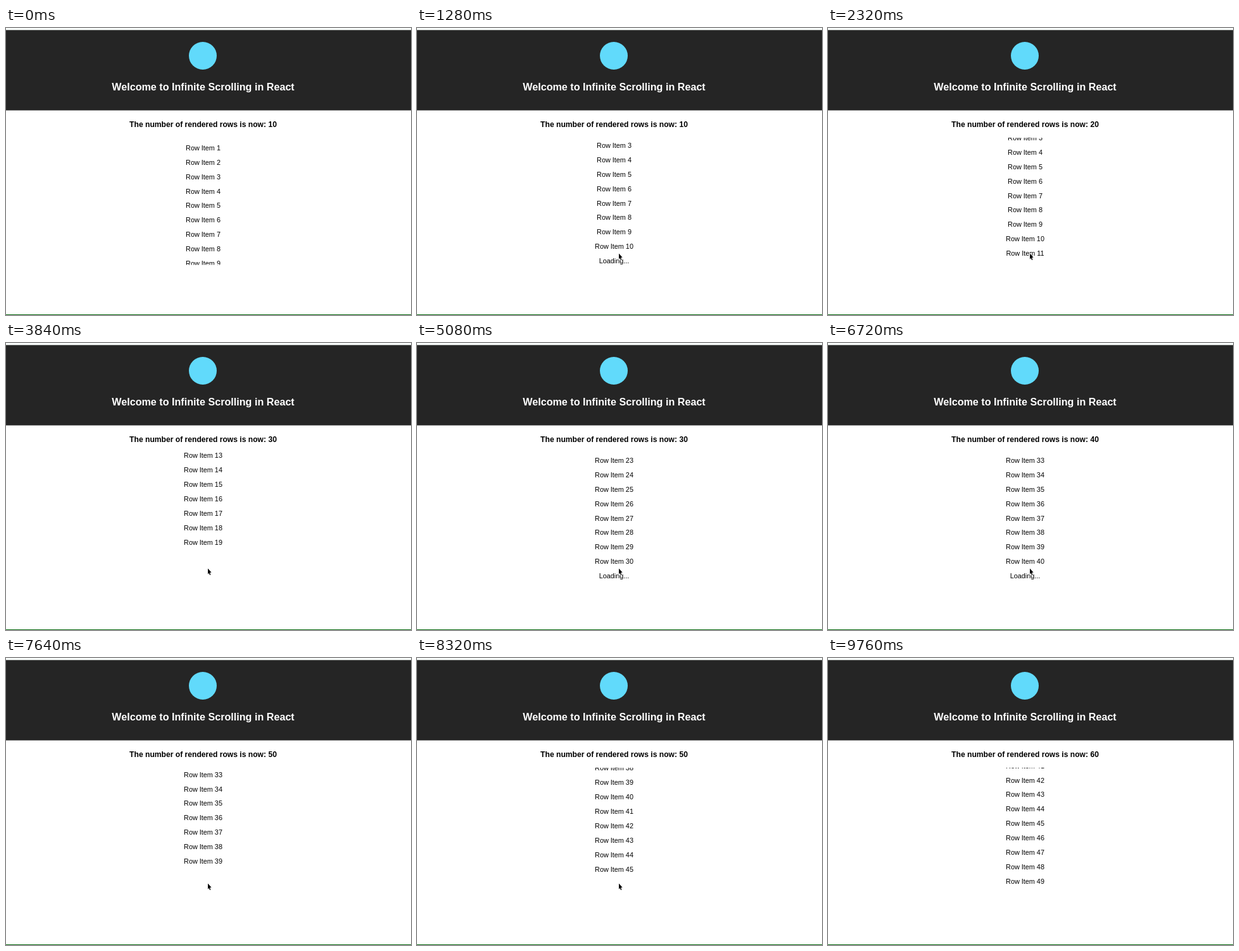
These frames come from a looping animation (640x455 px, 9.8 s). An HTML page with a canvas:

```html
<!DOCTYPE html>
<html lang="en">
<head>
<meta charset="utf-8">
<title>Infinite Scrolling</title>
<style>
  html, body { margin: 0; width: 100%; height: 100%; overflow: hidden; background: #fff; }
  canvas { display: block; width: 640px; height: 455px; }
</style>
</head>
<body>
<canvas id="stage" width="640" height="455"></canvas>
<script>
const ctx = document.getElementById('stage').getContext('2d');
const LOOP = 9800;
const FONT = '"Liberation Sans", Arial, sans-serif';
const CENTER = 311.5;
const LIST = { top: 174, bottom: 375.5, first: 194, pitch: 22.87 };

// Each batch of rows: pause, flick to the end of the list, wait, load.
const BATCH = 10;
const PAUSE = 680;
const WAIT = 300;
const FIRST_FLICK = 49.7;
const loads = [1577, 3020, 5280, 6900, 9268];
const flicks = loads.map((load, i) => ({
  start: (i ? loads[i - 1] : 0) + PAUSE,
  end: load - WAIT,
  distance: i ? BATCH * LIST.pitch : FIRST_FLICK
}));

const progress = (t, start, end) => Math.min(1, Math.max(0, (t - start) / (end - start)));
const smooth = p => p * p * (3 - 2 * p);
const ease = (t, start, end) => smooth(progress(t, start, end));

function scrollAt(t) {
  const down = flicks.reduce((sum, f) => sum + f.distance * ease(t, f.start, f.end), 0);
  return down - 30.4 * ease(t, 9300, 9640);
}

// In a long list the rows near the lower edge are painted late in a flick.
function paintedEdge(t, count) {
  const late = flicks.some(f => {
    const p = progress(t, f.start, f.end);
    return p > 0 && p < 0.6;
  });
  return late && count > 2 * BATCH ? 340 : LIST.bottom + 5;
}

function text(str, y, size, color, weight = '') {
  ctx.font = `${weight} ${size}px ${FONT}`;
  ctx.fillStyle = color;
  ctx.textAlign = 'center';
  ctx.fillText(str, CENTER, y);
}

function drawHeader() {
  ctx.fillStyle = '#f8fdfa';
  ctx.fillRect(0, 0, 640, 4);
  ctx.fillStyle = '#252525';
  ctx.fillRect(0, 3.3, 640, 127.3);
  ctx.fillStyle = '#61dafb';
  ctx.beginPath();
  ctx.arc(311, 44, 22, 0, Math.PI * 2);
  ctx.fill();
  text('Welcome to Infinite Scrolling in React', 98.8, 16.15, '#fff', 'bold');
}

function drawList(t, count) {
  const scroll = scrollAt(t);
  const edge = paintedEdge(t, count);
  ctx.save();
  ctx.beginPath();
  ctx.rect(0, LIST.top, 640, LIST.bottom - LIST.top);
  ctx.clip();
  for (let row = 1; row <= count + 1; row++) {
    const y = LIST.first + (row - 1) * LIST.pitch - scroll;
    if (y < LIST.top - 5 || y > edge) continue;
    text(row > count ? 'Loading...' : `Row Item ${row}`, y, 10.85, '#000');
  }
  ctx.restore();
}

function drawCursor(t) {
  if (t < 300 || t > 9640) return;
  const enter = 1 - ease(t, 300, 680);
  const leave = ease(t, 9300, 9640);
  ctx.save();
  ctx.translate(319 + 122 * enter + 33 * leave, 357.5 + 70 * enter + 98 * leave);
  ctx.scale(0.85, 0.95);
  ctx.beginPath();
  ctx.moveTo(0, 0);
  ctx.lineTo(0, 9.4);
  ctx.lineTo(2.1, 7.5);
  ctx.lineTo(3.6, 11);
  ctx.lineTo(5.2, 10.3);
  ctx.lineTo(3.7, 6.9);
  ctx.lineTo(6.6, 6.7);
  ctx.closePath();
  ctx.strokeStyle = '#fff';
  ctx.lineWidth = 1.4;
  ctx.stroke();
  ctx.fillStyle = '#000';
  ctx.fill();
  ctx.restore();
}

function draw(t) {
  const count = BATCH * (1 + loads.filter(load => load <= t).length);
  ctx.fillStyle = '#fff';
  ctx.fillRect(0, 0, 640, 455);
  drawHeader();
  text(`The number of rendered rows is now: ${count}`, 156.6, 12.12, '#000', 'bold');
  drawList(t, count);
  ctx.fillStyle = '#0b6b12';
  ctx.fillRect(0, 454, 640, 1);
  drawCursor(t);
}

const start = performance.now();
function frame() {
  draw((performance.now() - start) % LOOP);
  requestAnimationFrame(frame);
}
frame();
</script>
</body>
</html>
```
